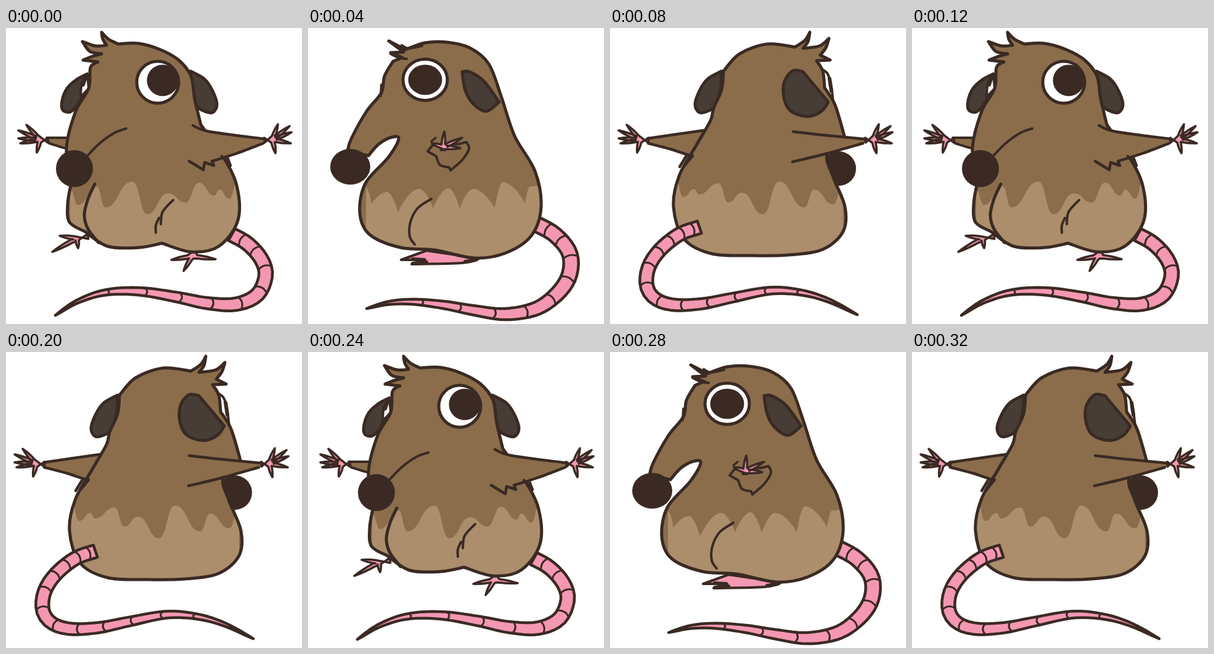
An HTML page for the animation above (360 ms loop, 480 by 480 pixels).

```html
<!DOCTYPE html>
<html lang="en">
<head>
<meta charset="utf-8">
<title>Spinning rat</title>
<style>
  html, body { margin: 0; width: 100%; height: 100%; overflow: hidden; background: #fff; }
  svg { display: block; width: 100%; height: 100%; }
  path, ellipse { stroke-linecap: round; stroke-linejoin: round; }
</style>
</head>
<body>
<svg id="stage" viewBox="0 0 480 480"></svg>
<script>
const STEP = 40;
const INK = '#3a2a23', FUR = '#8b6d4c', BELLY = '#ac8e6c', EAR = '#483c36', PINK = '#f497b3';
const SIDE_EAR = '299,70 322,83 335,102 342,124 335,137 320,134 307,124 300,95';
const LEFT_FINGERS = '-5,21 -32,6 -35,-2 -35,-15 -22,-24';
const RIGHT_FINGERS = '9,-25 28,-22 31,-12 30,6 5,22';
const stage = document.getElementById('stage');

function add(parent, tag, attrs) {
  const node = document.createElementNS('http://www.w3.org/2000/svg', tag);
  for (const key in attrs) node.setAttribute(key, attrs[key]);
  return parent.appendChild(node);
}

const parse = text => text.trim().split(/\s+/).map(pair => pair.split(',').map(Number));
const mirror = text => parse(text).map(([x, y]) => `${480 - x},${y}`).join(' ');

// Smooth curve through points; "/" marks a corner, ";" starts a new line.
function curve(text) {
  return text.split(';').map(line => {
    let last = null, d = '';
    for (const part of line.split('/')) {
      const run = parse(part);
      if (last) run.unshift(last); else d = 'M' + run[0];
      for (let i = 0; i < run.length - 1; i++) {
        const a = run[i - 1] || run[i], b = run[i], c = run[i + 1], e = run[i + 2] || c;
        const near = b.map((v, k) => v + (c[k] - a[k]) / 6);
        const far = c.map((v, k) => v - (e[k] - b[k]) / 6);
        d += `C${near} ${far} ${c}`;
      }
      last = run[run.length - 1];
    }
    return d;
  }).join('');
}

// Fur edge swinging between its highest and lowest points, filled downwards.
function wave(text, pointed) {
  const pts = parse(text);
  let d = 'M' + pts[0];
  for (let i = 1; i < pts.length; i++) {
    const [x0, y0] = pts[i - 1], [x1, y1] = pts[i], half = (x1 - x0) / 2;
    const out = pointed && y0 > y1 ? 0 : half, into = pointed && y1 > y0 ? 0 : half;
    d += `C${x0 + out},${y0} ${x1 - into},${y1} ${x1},${y1}`;
  }
  return d + `V400H${pts[0][0]}Z`;
}

// Pointed digits spreading from a palm, closed by a heel on the other side.
function pawPath(x, y, [hx, hy], tips) {
  const digits = parse(tips).map(([dx, dy]) => ({ dx, dy, size: Math.hypot(dx, dy) }));
  const at = (dx, dy) => `${x + dx},${y + dy} `;
  const heel = Math.hypot(hx, hy) / 4;
  let d = 'M' + at(hx + hy / heel, hy - hx / heel);
  digits.forEach(({ dx, dy, size }, i) => {
    const nx = -dy / size * 2.8, ny = dx / size * 2.8, next = digits[i + 1];
    d += 'L' + at(dx * .2 - nx, dy * .2 - ny);
    d += 'Q' + at(dx * .65 - nx, dy * .65 - ny) + at(dx, dy);
    d += 'Q' + at(dx * .65 + nx, dy * .65 + ny) + at(dx * .2 + nx, dy * .2 + ny);
    if (next) d += 'L' + at((dx / size + next.dx / next.size) * 4, (dy / size + next.dy / next.size) * 4);
  });
  return d + 'L' + at(hx - hy / heel, hy + hx / heel) + 'Z';
}

// Tapered ribbon with rings that get further apart towards the tip.
function tailPaths(spine, width, firstRing, gap, growth) {
  const guide = add(stage, 'path', { d: curve(spine) });
  const length = guide.getTotalLength();
  const point = (s, side, back = 0) => {
    const p = guide.getPointAtLength(s);
    const a = guide.getPointAtLength(Math.max(0, s - 1));
    const b = guide.getPointAtLength(Math.min(length, s + 1));
    const size = Math.hypot(b.x - a.x, b.y - a.y), ux = (b.x - a.x) / size, uy = (b.y - a.y) / size;
    const w = side * width * Math.min(1, 1.25 * (1 - s / length) ** 0.7);
    return `${p.x - uy * w - ux * back},${p.y + ux * w - uy * back} `;
  };
  const left = [], right = [];
  for (let i = 0; i <= 60; i++) {
    left.push(point(length * i / 60, 1));
    right.unshift(point(length * i / 60, -1));
  }
  let rings = '';
  for (let s = firstRing; s < length - 75; s += gap, gap += growth)
    rings += 'M' + point(s, 1) + 'Q' + point(s, 0, 8) + point(s, -1);
  guide.remove();
  return { ribbon: 'M' + left.concat(right).join('L') + 'Z', rings };
}

function pose(index, draw) {
  const g = add(stage, 'g', {});
  const path = (d, fill, width) => add(g, 'path', {
    d, fill, stroke: width ? INK : 'none', 'stroke-width': width });
  const shape = (fill, width, text) => path(curve(text) + 'Z', fill, width);
  const line = (width, text) => path(curve(text), 'none', width);
  const oval = (fill, width, cx, cy, rx, ry = rx) => add(g, 'ellipse', {
    cx, cy, rx, ry, fill, stroke: INK, 'stroke-width': width });
  const paw = (x, y, heel, tips) => path(pawPath(x, y, heel, tips), PINK, 3.5);
  const body = (outline, edge, pointed) => {
    const d = curve(outline) + 'Z', id = 'body' + index;
    add(add(g, 'clipPath', { id }), 'path', { d });
    path(d, FUR, 0);
    path(wave(edge, pointed), BELLY, 0).setAttribute('clip-path', `url(#${id})`);
    path(d, 'none', 5);
  };
  const tail = (...options) => {
    const { ribbon, rings } = tailPaths(...options);
    path(ribbon, PINK, 4.5);
    path(rings, 'none', 3);
  };

  draw({ shape, line, oval, paw, body, tail });
  g.animate(
    [{ opacity: 1, easing: 'step-end' }, { opacity: 0, offset: 1 / 3 }, { opacity: 0 }],
    { duration: 3 * STEP, delay: (index - 3) * STEP, iterations: Infinity });
}

// Facing front
pose(0, ({ shape, line, oval, paw, body, tail }) => {
  tail('366,335 392,350 414,375 421,402 407,433 372,448 325,446 275,436 215,427 160,429 115,444 80,466', 11, 20, 27, 5);
  paw(115, 341, [18, -3], '2,16 -40,22 -28,-4');
  paw(302, 370, [4, -14], '38,5 -14,24 -34,6');
  shape(EAR, 5, '131,75 114,84 99,98 91,118 92,133 104,136 115,126 128,105');
  shape('#fff', 4, '132,74 123,90 121,112 / 134,98');
  line(6, '130,77 125,92');
  shape(EAR, 5, SIDE_EAR);
  shape(FUR, 4, '66,178 105,178 / 105,196 70,187');
  paw(55, 181, [13, 1], LEFT_FINGERS);
  body('182,26 215,25 250,35 280,52 300,78 306,115 316,157 / 350,205 374,255 376,312 345,354 300,363 253,349 / 215,356 165,354 128,330 / 103,315 100,285 106,250 / 98,195 113,135 134,98 137,64 149,55 / 125,52 / 140,46 155,42 / 136,38 124,22 / 145,29 163,28 / 157,18 155,7 / 166,18 182,26',
    '104,262 117,287 147,257 161,291 205,249 229,302 263,268 291,283 313,251 338,272 346,262 362,277 376,245');
  line(5, '144,253 133,277 127,303 133,326 150,348');
  line(4, '271,279 254,298 251,318; 248,308 243,320 243,332');
  shape(FUR, 0, '303,158 330,168 420,180 / 417,187 334,217 / 320,230 / 297,216');
  line(4.5, '303,158 330,168 420,180; 297,216 / 320,230 / 322,218 / 337,223 / 334,216 / 375,203 417,187; 350,208 / 364,223 / 359,210');
  paw(432, 181, [-13, 1], RIGHT_FINGERS);
  line(4, '195,163 176,170 153,186 133,206');
  oval(INK, 0, 111, 228, 30);
  oval('#fff', 5, 246, 88, 34);
  oval(INK, 0, 254, 85, 25.5);
});

// Side view
pose(1, ({ shape, line, oval, paw, body, tail }) => {
  tail('368,317 400,335 424,365 424,400 405,430 370,455 320,464 270,458 220,449 170,444 130,446 95,455', 12, 24, 27, 5);
  shape(PINK, 4, '192,361 / 151,376 / 190,376 / 168,383 / 250,381 276,375 / 240,368');
  line(6, '170,375 188,376; 170,382 192,380; 255,379 272,376');
  body('158,35 190,24 225,23 262,32 293,58 313,110 335,175 368,232 378,290 362,337 320,365 270,373 205,360 150,356 100,335 84,300 93,252 130,210 147,180 136,177 115,188 98,207 / 64,200 / 70,180 95,135 119,105 124,78 138,54 / 153,48 / 134,40 / 155,39 / 131,21 / 158,35',
    '94,258 103,285 128,266 146,299 180,261 203,292 228,260 246,293 268,261 303,292 316,250 352,284 360,257 380,256', true);
  line(4, '152,28 163,33 185,29; 134,42 147,48 160,50; 119,92 118,110');
  oval(INK, 0, 68.5, 225, 32.5, 29);
  oval('#fff', 5, 190, 84, 36, 33.5);
  oval(INK, 0, 190, 84, 27.5, 24.5);
  shape(EAR, 5, '250,71 262,71 285,86 310,120 / 289,135 268,123 255,101 250,71');
  line(4, '200,277 178,292 166,315 165,338 173,351');
  shape(FUR, 4, '202,190 194,200 / 208,208 / 214,222 229,226 / 231,231 / 250,214 261,196 257,185 / 245,188');
  paw(219, 193, [0, 5], '-18,-6 2,-25 31,-15 28,2');
  line(3.5, '200,184 207,178');
});

// Seen from behind
pose(2, ({ shape, line, oval, paw, body, tail }) => {
  shape(FUR, 4.5, '62,179 110,172 175,163 / 175,215 / 135,208 100,197 62,187');
  paw(49, 181, [13, 1], LEFT_FINGERS);
  oval(INK, 0, 371, 228, 28);
  line(4, '341,66 352,73 358,90 362,120');
  line(6, '356,82 359,102');
  shape(EAR, 5, mirror(SIDE_EAR));
  body('300,31 316,20 324,7 / 321,22 313,33 / 340,29 355,17 / 350,32 341,44 / 357,52 / 335,53 / 345,70 348,97 / 365,125 380,175 / 352,205 362,242 381,290 378,330 345,359 290,368 230,369 165,366 120,342 103,290 112,240 140,190 163,150 168,130 181,100 184,70 / 210,42 255,26 300,31',
    '105,240 119,274 137,261 144,270 176,252 192,283 214,267 248,302 274,249 315,291 331,262 362,286 378,255');
  line(4.5, '124,207 113,225; 134,207 121,223');
  shape(EAR, 5, '313,71 297,69 284,84 281,105 288,129 303,140 325,143 344,134 354,120 / 313,71');
  shape(FUR, 0, '297,168 412,180 / 410,187 296,217');
  line(4.5, '297,168 350,174 412,180; 296,217 350,204 410,187');
  paw(427, 181, [-13, 1], RIGHT_FINGERS);
  tail('145,323 112,335 80,361 62,390 60,420 75,440 105,449 150,447 200,437 260,426 310,429 355,442 401,465', 10.5, 13, 18, 3.5);
});
</script>
</body>
</html>
```
